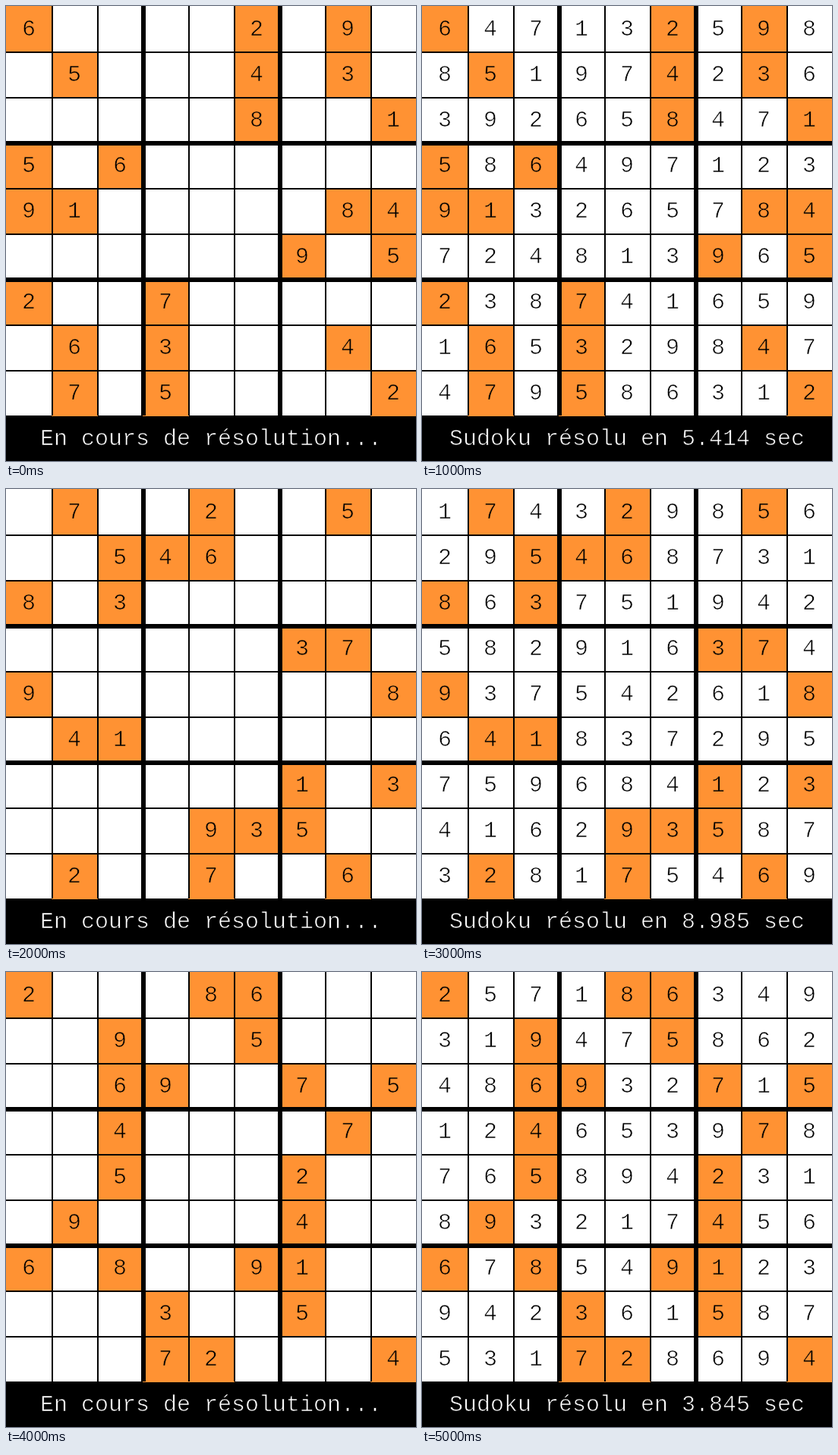
Animation of 540x600 px, one loop 6 s. Source, as an HTML page:

```html
<!DOCTYPE html>
<html lang="fr">
<head>
<meta charset="utf-8">
<title>Sudoku</title>
<style>
  html, body { margin: 0; width: 100%; height: 100%; overflow: hidden; background: #fff; }
  svg { display: block; width: 540px; height: 600px; }
  /* The outline takes the background colour, which slims the strokes of the type. */
  text {
    font: 30px "Liberation Mono", monospace;
    text-anchor: middle;
    fill: #000;
    stroke: #fff;
    stroke-width: .7px;
  }
  .given rect { fill: #ff9233; }
  .given text { stroke: #ff9233; }
  .status { fill: #fff; stroke: #000; }
  .board { opacity: 0; animation: board 6s step-end infinite; }
  .pending { animation: pending 2s step-end infinite; }
  .solved { animation: solved 2s step-end infinite; }
  @keyframes board { 0% { opacity: 1 } 33.3333%, 100% { opacity: 0 } }
  @keyframes pending { 0% { opacity: 1 } 50%, 100% { opacity: 0 } }
  @keyframes solved { 0% { opacity: 0 } 50%, 100% { opacity: 1 } }
</style>
</head>
<body>
<svg viewBox="0 0 540 600"></svg>
<script>
const CELL = 60;

// Solved grids, row by row; a star marks a digit given at the start.
const puzzles = [
  { time: "5.414", grid: `
    6*47  132*  59*8
    85*1  974*  23*6
    392   658*  471*
    5*86* 497   123
    9*1*3 265   78*4*
    724   813   9*65*
    2*38  7*41  659
    16*5  3*29  84*7
    47*9  5*86  312*` },
  { time: "8.985", grid: `
    17*4  32*9  85*6
    295*  4*6*8 731
    8*63* 751   942
    582   916   3*7*4
    9*37  542   618*
    64*1* 837   295
    759   684   1*23*
    416   29*3* 5*87
    32*8  17*5  46*9` },
  { time: "3.845", grid: `
    2*57  18*6* 349
    319*  475*  862
    486*  9*32  7*15*
    124*  653   97*8
    765*  894   2*31
    89*3  217   4*56
    6*78* 549*  1*23
    942   3*61  5*87
    531   7*2*8 694*` }
];

const rect = (x, y, w, h) => `<rect x="${x}" y="${y}" width="${w}" height="${h}"/>`;
const group = (name, content, style = "") => `<g class="${name}" style="${style}">${content}</g>`;
const status = text => `<text class="status" x="270" y="579">${text}</text>`;

function board({ time, grid }, index) {
  let given = "", found = "";
  [...grid.matchAll(/(\d)(\*?)/g)].forEach(([, digit, star], i) => {
    const x = i % 9 * CELL, y = Math.floor(i / 9) * CELL;
    const label = `<text x="${x + 30}" y="${y + 39}">${digit}</text>`;
    if (star) given += rect(x, y, CELL + 1, CELL + 1) + label;
    else found += label;
  });
  return group("board",
    group("given", given) +
    group("pending", status("En cours de résolution...")) +
    group("solved", found + status(`Sudoku résolu en ${time} sec`)),
    `animation-delay:${index * 2 - 6}s`);
}

function lines() {
  let out = "";
  for (let i = 1; i < 9; i++) {
    const width = i % 3 ? 2 : 6, start = i * CELL + 1 - width / 2;
    out += rect(start, 0, width, 540) + rect(0, start, 540, width);
  }
  return out;
}

document.querySelector("svg").innerHTML =
  rect(0, 540, 540, 60) + puzzles.map(board).join("") + lines();
</script>
</body>
</html>
```
